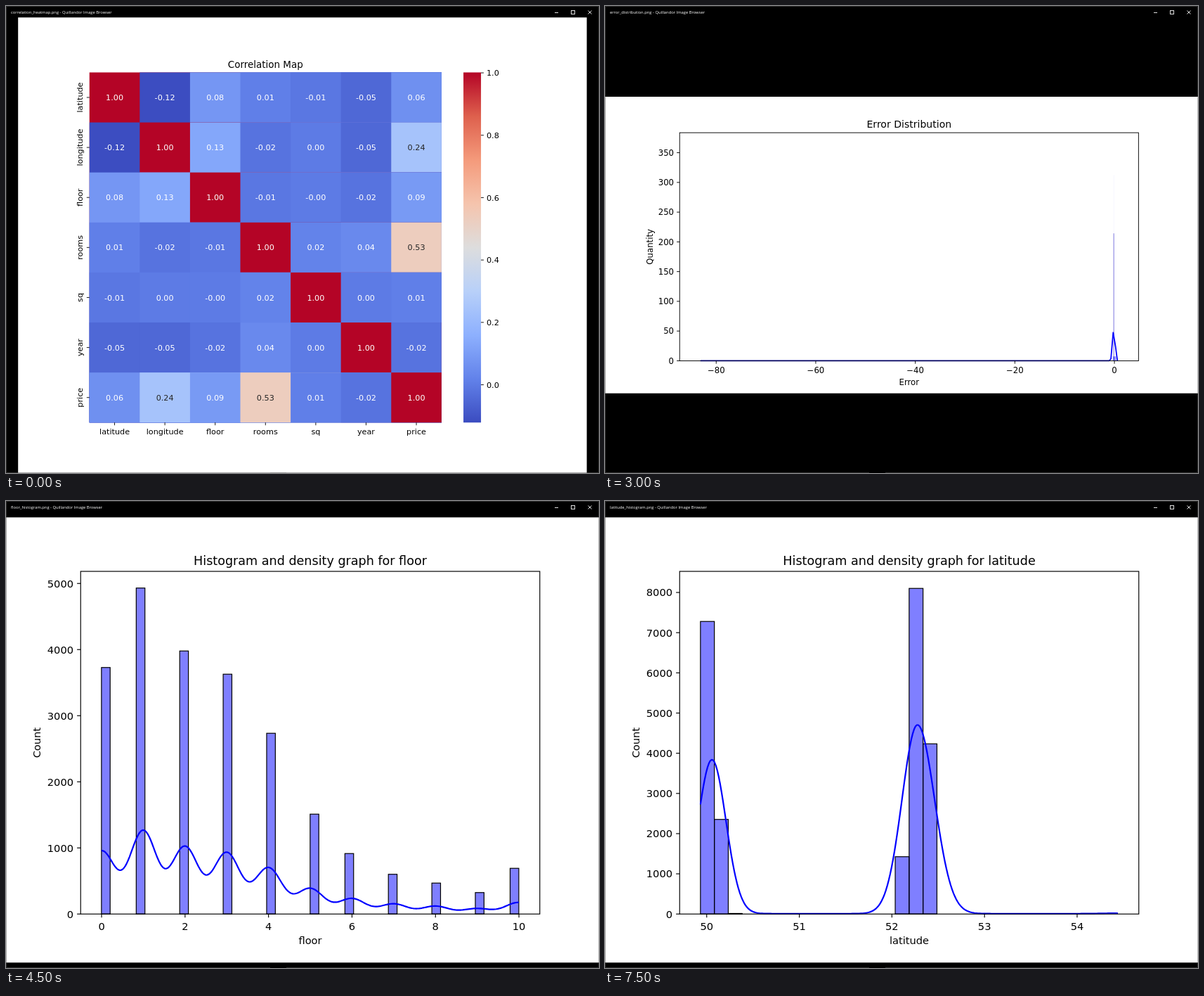
These frames come from a looping animation (844x664 px, 8000 ms). An HTML page with a canvas:

```html
<!DOCTYPE html>
<html lang="en">
<head>
<meta charset="utf-8">
<title>Chart slideshow</title>
<style>
html, body { margin: 0; width: 100%; height: 100%; overflow: hidden; background: #000; }
canvas { display: block; width: 844px; height: 664px; }
</style>
</head>
<body>
<canvas id="stage" width="844" height="664"></canvas>
<script>
const ctx = document.getElementById('stage').getContext('2d');
const BLUE = '#1f77b4', ORANGE = '#ff7f0e', GREEN = '#2ca02c';
const APP = 'Quillandor Image Browser';
const LOOP = 8000, HOLD = 1500;

// Plot areas; s is the scale of the figure
const WIDE = { s: 0.8435, l: 106, r: 759.1, t: 179.9, b: 504.3 };
const TALL = { s: 1.054, l: 106, r: 759.5, t: 99.8, b: 587 };
const MAP = { s: 0.8085, l: 118.5, r: 619.6, t: 94.2, b: 592 };

const range = n => [...Array(n).keys()];

function label(str, x, y, size, align = 'center', color = '#000', turned = false) {
  ctx.save();
  ctx.translate(x, y);
  if (turned) ctx.rotate(-Math.PI / 2);
  ctx.font = `${size}px "DejaVu Sans", sans-serif`;
  ctx.textAlign = align;
  ctx.fillStyle = color;
  ctx.fillText(str, 0, 0);
  ctx.restore();
}

function line(points, color, width) {
  ctx.strokeStyle = color;
  ctx.lineWidth = width;
  ctx.lineJoin = 'round';
  ctx.beginPath();
  points.forEach(([x, y]) => ctx.lineTo(x, y));
  ctx.stroke();
}

function dots(points, color, radius) {
  ctx.fillStyle = color;
  for (const [x, y] of points) {
    ctx.beginPath();
    ctx.arc(x, y, radius, 0, 7);
    ctx.fill();
  }
}

function series(points, color, s) {
  line(points, color, 2.08 * s);
  dots(points, color, 4.86 * s);
}

function clipTo(a) {
  ctx.beginPath();
  ctx.rect(a.l, a.t, a.r - a.l, a.b - a.t);
  ctx.clip();
}

const xTick = (a, x) => line([[x, a.b], [x, a.b + 4.86 * a.s]], '#000', 1.11 * a.s);
const yTick = (a, y) => line([[a.l, y], [a.l - 4.86 * a.s, y]], '#000', 1.11 * a.s);
const title = (a, str) => label(str, (a.l + a.r) / 2, a.t - 8.2 * a.s, 16.67 * a.s);

// Ticks are [text, position] pairs
function axes(a, name, xName, yName, xTicks, yTicks) {
  const { s } = a, size = 13.89 * s, edge = a.l - 9.72 * s;
  ctx.strokeStyle = '#000';
  ctx.lineWidth = 1.11 * s;
  ctx.lineJoin = 'miter';
  ctx.strokeRect(a.l, a.t, a.r - a.l, a.b - a.t);
  for (const [str, x] of xTicks) {
    xTick(a, x);
    label(str, x, a.b + 21.2 * s, size);
  }
  let widest = 0;
  for (const [str, y] of yTicks) {
    yTick(a, y);
    label(str, edge, y + 0.365 * size, size, 'right');
    ctx.font = `${size}px "DejaVu Sans", sans-serif`;
    widest = Math.max(widest, ctx.measureText(str).width);
  }
  label(xName, (a.l + a.r) / 2, a.b + 40.4 * s, size);
  label(yName, edge - widest - 8.86 * s, (a.t + a.b) / 2, size, 'center', '#000', true);
  title(a, name);
}

// n ticks starting at value v, pixel p
const ticks = (n, v, dv, p, dp, digits = 0) => range(n).map(i =>
  [(v + i * dv).toFixed(digits).replace('-', '\u2212'), p + i * dp]);

// Diverging blue to red colour scale
const SCALE = [[59, 76, 192], [98, 130, 234], [141, 176, 254], [184, 208, 249], [221, 221, 221],
  [245, 196, 173], [244, 154, 123], [222, 96, 77], [180, 4, 38]];

function shade(t) {
  const p = Math.max(0, Math.min(1, t)) * 8, i = Math.min(7, Math.floor(p));
  const c = SCALE[i].map((v, k) => Math.round(v + (SCALE[i + 1][k] - v) * (p - i)));
  return `rgb(${c})`;
}

const NAMES = ['latitude', 'longitude', 'floor', 'rooms', 'sq', 'year', 'price'];
const UPPER = [
  ['-0.12', '0.08', '0.01', '-0.01', '-0.05', '0.06'],
  ['0.13', '-0.02', '0.00', '-0.05', '0.24'],
  ['-0.01', '-0.00', '-0.02', '0.09'],
  ['0.02', '0.04', '0.53'],
  ['0.00', '0.01'],
  ['-0.02']
];
const LOW = -0.1225;

function heatmap() {
  const a = MAP, size = 13.89 * a.s;
  const w = (a.r - a.l) / 7, h = (a.b - a.t) / 7;
  for (const r of range(7)) for (const c of range(7)) {
    const lo = Math.min(r, c), gap = Math.abs(r - c);
    const str = gap ? UPPER[lo][gap - 1] : '1.00';
    const x = a.l + c * w, y = a.t + r * h;
    // Each cell runs on to the far corner so that later cells leave no seams
    ctx.fillStyle = shade((str - LOW) / (1 - LOW));
    ctx.fillRect(x, y, a.r - x, a.b - y);
    label(str, x + w / 2, y + h / 2 + 4.1, size, 'center',
      str > 0.2 && str < 0.9 ? '#262626' : '#fff');
  }
  NAMES.forEach((name, i) => {
    const x = a.l + (i + 0.5) * w, y = a.t + (i + 0.5) * h;
    xTick(a, x);
    yTick(a, y);
    label(name, x, a.b + 21.2 * a.s, size);
    label(name, 109.2, y, size, 'center', '#000', true);
  });
  title(a, 'Correlation Map');

  const bar = ctx.createLinearGradient(0, a.b, 0, a.t);
  for (const i of range(9)) bar.addColorStop(i / 8, shade(i / 8));
  ctx.fillStyle = bar;
  ctx.fillRect(650.8, a.t, 25, a.b - a.t);
  for (const [str, y] of ticks(6, 1, -0.2, 94.8, 88.7, 1)) {
    line([[675.8, y], [679.7, y]], '#000', 0.9);
    label(str, 683.7, y + 4.1, size, 'left');
  }
}

function epochs() {
  series([[135.6, 489.5], [333.4, 194.7], [729.2, 341.2]], BLUE, WIDE.s);
  axes(WIDE, 'Analysis of Epochs: Validation Loss vs Number of Epochs',
    'Number of Epochs', 'Best Validation Loss',
    ticks(8, 60, 20, 175, 79.17), ticks(7, 0.00776, 0.00002, 469.8, -45.3, 5));
}

function errors() {
  ctx.save();
  clipTo(WIDE);
  ctx.fillStyle = 'rgba(0,0,255,.03)';
  ctx.fillRect(723.5, 240, 1, 83);
  ctx.fillStyle = 'rgba(40,30,200,.6)';
  ctx.fillRect(723.4, 323, 1, 181);
  ctx.fillStyle = 'rgba(0,0,255,.45)';
  ctx.fillRect(722.5, 498, 4.5, 6);
  ctx.restore();
  line([[135.5, 504.2], [717.5, 504], [719.8, 501.5], [723, 464], [726.4, 484], [729, 503.8]],
    '#00f', 2.08 * WIDE.s);
  axes(WIDE, 'Error Distribution', 'Error', 'Quantity',
    ticks(5, -80, 20, 158, 141.7), ticks(8, 0, 50, 504.2, -42.27));
}

// Bars are [bin, height] pairs
function histogram(bars, binWidth, density) {
  const left = 135.6, right = 729.6;
  ctx.lineJoin = 'miter';
  for (const [bin, h] of bars) {
    const box = [left + bin * binWidth, TALL.b - h, binWidth, h];
    ctx.fillStyle = 'rgba(0,0,255,.5)';
    ctx.fillRect(...box);
    ctx.strokeStyle = '#000';
    ctx.lineWidth = 1.2;
    ctx.strokeRect(...box);
  }
  const curve = range(298).map(i => {
    const x = Math.min(right, left + i * 2);
    return [x, TALL.b - density(x)];
  });
  line(curve, '#00f', 2.08 * TALL.s);
}

// Bell curve, optionally wider on its right side
function bell(x, mid, sigma, rightSigma = sigma) {
  const d = (x - mid) / (x < mid ? sigma : rightSigma);
  return Math.exp(-d * d / 2);
}

function floors() {
  const bins = [0, 4, 9, 14, 19, 24, 28, 33, 38, 43, 47];
  const heights = [350.5, 463.5, 374, 341, 257, 142, 86, 56.5, 44, 30.5, 65];
  histogram(bins.map((b, i) => [b, heights[i]]), 12.375, x =>
    0.254 * heights.reduce((sum, h, i) => sum + h * bell(x, 135.6 + i * 59.4, 19.3), 0));
  axes(TALL, 'Histogram and density graph for floor', 'floor', 'Count',
    ticks(6, 0, 2, 135.8, 118.8), ticks(6, 0, 1000, 587, -94));
}

function latitudes() {
  histogram([[0, 416], [1, 134.5], [2, 0.8], [14, 81.5], [15, 463], [16, 242]], 19.8, x =>
    0.5 + 219 * bell(x, 152, 19.8) + 268.5 * bell(x, 444.5, 22, 24.3) + 0.6 * bell(x, 725, 20));
  axes(TALL, 'Histogram and density graph for latitude', 'latitude', 'Count',
    ticks(5, 50, 1, 144.5, 131.8), ticks(9, 0, 1000, 587, -57.15));
}

// Heights of three sweeps over the same three rates
const RUNS = [
  ['adam', BLUE, [472, 466, 246, 477.2, 481, 441.5, 422, 387, 204]],
  ['sgd', ORANGE, [489.3, 415.8, 416.6, 460.7, 488, 429, 388, 381.5, 194.8]],
  ['rmsprop', GREEN, [453.5, 457.4, 434.6, 445.8, 446, 426, 419.8, 412.8, 307.8]]
];

function tuning() {
  const rates = [135.6, 399.4, 729.2], { s } = WIDE;
  for (const [, color, ys] of RUNS) series(ys.map((y, i) => [rates[i % 3], y]), color, s);
  axes(WIDE, 'Hyperparameter Tuning: Validation Loss vs Learning Rate',
    'Learning Rate', 'Validation Loss',
    ticks(5, 0.0002, 0.0002, 201.8, 131.85, 4), ticks(9, 0.008, 0.0002, 502, -37, 4));
  ctx.beginPath();
  ctx.roundRect(111.8, 185.8, 156, 56.7, 2.4);
  ctx.fillStyle = 'rgba(255,255,255,.8)';
  ctx.fill();
  ctx.strokeStyle = 'rgba(204,204,204,.8)';
  ctx.lineWidth = 1.17;
  ctx.stroke();
  RUNS.forEach(([name, color], i) => {
    const y = 195.7 + i * 17.5;
    line([[116.3, y], [139.8, y]], color, 2.08 * s);
    dots([[128, y]], color, 4.86 * s);
    label('Optimizer: ' + name, 148.8, y + 4, 13.89 * s, 'left');
  });
}

// Paper rectangles
const SQUARE_PAGE = [17.2, 16.3, 809.4, 647.3];
const WIDE_PAGE = [0.4, 129, 843.3, 421.7];
const TALL_PAGE = [0.4, 23.3, 843.3, 633];

const SLIDES = [
  ['correlation_heatmap', SQUARE_PAGE, heatmap],
  ['epoch_analysis_plot', WIDE_PAGE, epochs],
  ['error_distribution', WIDE_PAGE, errors],
  ['floor_histogram', TALL_PAGE, floors],
  ['hyperparameter_tuning_plot', WIDE_PAGE, tuning],
  ['latitude_histogram', TALL_PAGE, latitudes]
];

function windowFrame(file) {
  ctx.strokeStyle = '#2e2e2e';
  ctx.lineWidth = 1;
  ctx.strokeRect(0.5, 0.5, 843, 663);
  ctx.fillStyle = '#000';
  ctx.fillRect(376, 663, 23, 1);
  ctx.font = '5.8px "Open Sans", sans-serif';
  ctx.textAlign = 'left';
  ctx.fillStyle = '#fff';
  ctx.fillText(`${file}.png - ${APP}`, 7, 11);
  line([[781, 9.5], [786, 9.5]], '#ddd', 1);
  ctx.lineJoin = 'miter';
  ctx.strokeRect(804.5, 6.5, 5, 5);
  line([[828.5, 6.5], [833.5, 11.5]], '#ddd', 1);
  line([[833.5, 6.5], [828.5, 11.5]], '#ddd', 1);
}

function draw(now) {
  const [file, page, plot] = SLIDES[Math.floor((now % LOOP) / HOLD)];
  ctx.fillStyle = '#000';
  ctx.fillRect(0, 0, 844, 664);
  windowFrame(file);
  ctx.fillStyle = '#fff';
  ctx.fillRect(...page);
  ctx.save();
  ctx.translate(0.25, 0.25);
  plot();
  ctx.restore();
}

let start;
function tick(now) {
  start ??= now;
  draw(now - start);
  requestAnimationFrame(tick);
}
draw(0);
requestAnimationFrame(tick);
</script>
</body>
</html>
```
